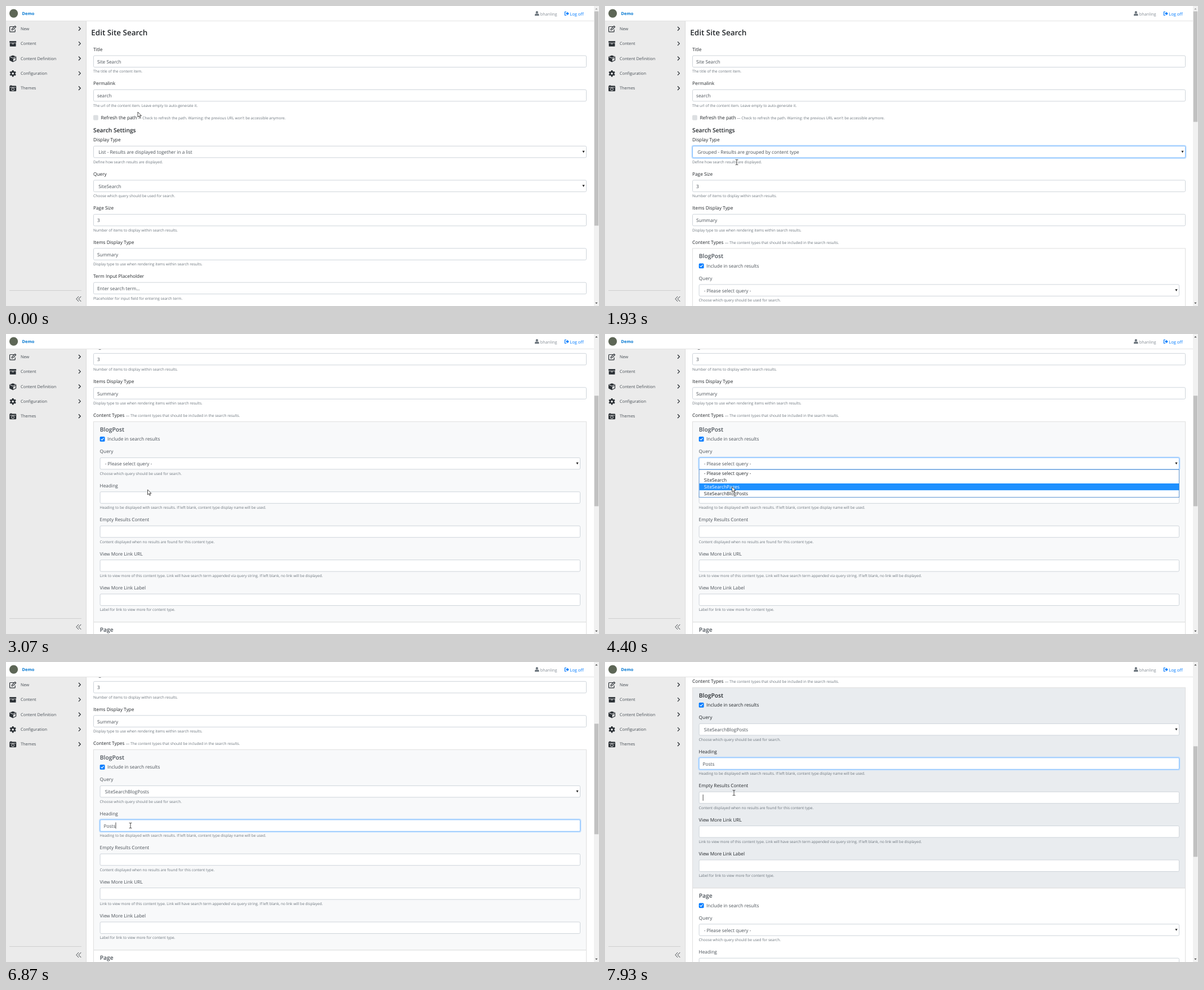
These frames come from a looping animation (1053 by 532 pixels, 8000 ms). An HTML page:

```html
<!DOCTYPE html>
<html lang="en">
<head>
<meta charset="utf-8">
<title>Edit Site Search</title>
<style>
  html, body { margin: 0; width: 100%; height: 100%; overflow: hidden; background: #fff; }
  svg { display: block; width: 100%; height: 100%; }
  text { font: 8.3px "Open Sans", "Noto Sans", sans-serif; white-space: pre; text-rendering: geometricPrecision; }
  .help { font-size: 6.6px; fill: #6c757d; }
  .val { fill: #495057; }
  .h4 { font-size: 13.5px; font-weight: 600; }
  .h5 { font-size: 10.25px; font-weight: 600; }
  .nav { font-size: 7.4px; fill: #495057; }
  .brand { font-size: 7.4px; font-weight: 700; fill: #0076d1; }
  .user { font-size: 7.3px; fill: #868e96; }
  .link { font-size: 7.6px; fill: #007bff; }
</style>
</head>
<body>
<svg id="stage" viewBox="0 0 1053 532"></svg>
<script>
const NS = 'http://www.w3.org/2000/svg';
const stage = document.getElementById('stage');

function el(parent, name, attrs = {}, content) {
  const node = document.createElementNS(NS, name);
  for (const key in attrs) node.setAttribute(key, attrs[key]);
  if (content) node.textContent = content;
  return parent.appendChild(node);
}
const group = (parent, attrs) => el(parent, 'g', attrs);
const label = (parent, x, y, str, cls = '') => el(parent, 'text', { x, y, class: cls }, str);
const rect = (parent, x, y, width, height, fill, more) =>
  el(parent, 'rect', { x, y, width, height, fill, ...more });
const line = (parent, d, stroke, width = 1) =>
  el(parent, 'path', { d, stroke, fill: 'none', 'stroke-width': width, 'stroke-linecap': 'round', 'stroke-linejoin': 'round' });
const shape = (parent, d, fill) => el(parent, 'path', { d, fill });
const show = (node, on) => node.setAttribute('display', on ? 'inline' : 'none');
const move = (node, x, y) => node.setAttribute('transform', `translate(${x} ${y})`);

// One form row; y is the middle of its label.
function field(parent, y, name, value, help, { x = 155, w = 876, select = false } = {}) {
  label(parent, x, y + 3, name);
  const box = { rx: 2, stroke: '#ced4da' };
  rect(parent, x + .5, y + 11, w - 1, 20.5, '#fff', box);
  const ring = group(parent);
  rect(ring, x - .6, y + 9.9, w + 1.2, 22.7, 'none', { rx: 3, stroke: '#bfdeff', 'stroke-width': 1.8 });
  rect(ring, x + .5, y + 11, w - 1, 20.5, '#fff', { rx: 2, stroke: '#80bdff' });
  show(ring, false);
  const text = label(parent, x + (select ? 9.2 : 7), y + 24.8, value, 'val');
  if (select) shape(parent, `M${x + w - 7.6} ${y + 19.4}h4.2l-2.1 3.6z`, '#222');
  label(parent, x, y + 41.3, help, 'help');
  return { ring, text };
}

function dropdown(parent, x, y, w, items) {
  const g = group(parent), row = 12.1;
  rect(g, x + .5, y + .5, w - 1, row * items.length + .8, '#fff', { stroke: '#5a92cf' });
  const bar = rect(g, x + 1, 0, w - 2, row, '#1e90ff');
  const texts = items.map((str, i) => label(g, x + 9.2, y + row * i + 9.8, str));
  return index => {
    show(g, index >= 0);
    bar.setAttribute('y', y + .9 + row * Math.max(index, 0));
    texts.forEach((t, i) => t.setAttribute('fill', i === index ? '#fff' : '#212529'));
  };
}

function tick(parent, y) {
  rect(parent, 166.7, y - 4.4, 8.8, 8.8, '#007bff', { rx: 1.6 });
  line(parent, `M169 ${y + .2}l1.5 1.6l2.8-3.6`, '#fff', 1.2);
  label(parent, 180, y + 3, 'Include in search results');
}

function card(parent, y, name, rows) {
  const g = group(parent, { fill: '#495057' });
  const back = rect(g, 155.5, y, 875, 355.4, '#fff', { stroke: '#dfdfdf' });
  label(g, 166.8, y + 17.4, name, 'h5');
  tick(g, y + 31);
  const opts = { x: 166.6, w: 853.4 };
  const parts = rows.map(([title, value, help], i) =>
    field(g, y + 53 + 60.4 * i, title, value, help, { ...opts, select: i === 0 }));
  return { g, back, parts };
}

// Scrolling page
rect(stage, 0, 0, 1053, 532, '#fff');
const page = group(stage, { fill: '#212529' });
label(page, 151.2, 51.6, 'Edit Site Search', 'h4');
field(page, 77, 'Title', 'Site Search', 'The title of the content item.');
field(page, 137.4, 'Permalink', 'search', 'The url of the content item. Leave empty to auto-generate it.');
rect(page, 155, 193.6, 8.8, 8.8, '#dcdfe2', { rx: 1.6 });
label(page, 168.4, 201, 'Refresh the path');
label(page, 234, 200.8, "— Check to refresh the path. Warning: the previous URL won't be accessible anymore.", 'help');
label(page, 155, 224, 'Search Settings', 'h5');

const chooseQuery = 'Choose which query should be used for search.';
const listName = 'List - Results are displayed together in a list';
const groupName = 'Grouped - Results are grouped by content type';
const pickQuery = '- Please select query -';
const display = field(page, 237.4, 'Display Type', listName, 'Define how search results are displayed.', { select: true });

function sizeRows(g, y) {
  field(g, y, 'Page Size', '3', 'Number of items to display within search results.');
  field(g, y + 60.4, 'Items Display Type', 'Summary', 'Display type to use when rendering items within search results.');
}
const listView = group(page);
field(listView, 297.9, 'Query', 'SiteSearch', chooseQuery, { select: true });
sizeRows(listView, 358.4);
field(listView, 479.2, 'Term Input Placeholder', 'Enter search term...', 'Placeholder for input field for entering search term.');

const groupView = group(page);
sizeRows(groupView, 297.9);
label(groupView, 155, 421.8, 'Content Types');
label(groupView, 212.8, 421.6, '— The content types that should be included in the search results.', 'help');
const rows = [
  ['Query', pickQuery, chooseQuery],
  ['Heading', '', 'Heading to be displayed with search results. If left blank, content type display name will be used.'],
  ['Empty Results Content', '', 'Content displayed when no results are found for this content type.'],
  ['View More Link URL', '', 'Link to view more of this content type. Link will have search term appended via query string. If left blank, no link will be displayed.'],
  ['View More Link Label', '', 'Label for link to view more for content type.']
];
card(groupView, 785.3, 'Page', rows);
const posts = card(groupView, 429.9, 'BlogPost', rows);
const [query, heading] = posts.parts;
const caret = rect(groupView, 0, 0, .8, 11, '#222');

const displayList = dropdown(page, 155, 269.6, 876, [listName, groupName]);
const queryList = dropdown(page, 166.6, 514.4, 853.4, [pickQuery, 'SiteSearch', 'SiteSearchPages', 'SiteSearchBlogPosts']);
const hint = group(page);
rect(hint, 166.8, 576, 105.6, 30.4, '#fff', { rx: 1.5, stroke: '#cfd3d7', 'stroke-width': .8 });
label(hint, 175.5, 594, 'Posts');

// Top bar and side menu
rect(stage, 0, 0, 1044, 26, '#fff');
rect(stage, 0, 26, 1044, 1, '#e3e3e3');
rect(stage, 0, 27, 142, 505, '#ebebeb');
rect(stage, 142, 27, 1, 505, '#dadada');
el(stage, 'circle', { cx: 13.6, cy: 13.1, r: 7.6, fill: '#5d6656' });
label(stage, 28.6, 16, 'Demo', 'brand');
el(stage, 'circle', { cx: 942.8, cy: 11.2, r: 2.1, fill: '#6c757d' });
shape(stage, 'M939 17.2v-1.4q0-2.3 2.2-2.3h3.2q2.2 0 2.2 2.3v1.4z', '#6c757d');
label(stage, 948.8, 16.5, 'bhanling', 'user');
line(stage, 'M994.6 10.3h-2.2v6.2h2.2', '#007bff', 1.1);
shape(stage, 'M994.3 12.3h2.2v-2.2l3.2 3.3l-3.2 3.3v-2.2h-2.2z', '#007bff');
label(stage, 1001.2, 16.5, 'Log off', 'link');

const ink = '#2b3035';
const icons = [
  g => {
    line(g, 'M2-4.2h-6.6q-1 0-1 1v7.4q0 1 1 1h7.6q1 0 1-1v-2.8', ink, 1.2);
    line(g, 'M-2 2l.5-2.2l5.3-5.2l1.7 1.7l-5.2 5.2z', ink, 1.1);
  },
  g => {
    rect(g, -6, -4.8, 12, 2.7, ink, { rx: .5 });
    rect(g, -5.4, -1.4, 10.8, 6.2, ink, { rx: .6 });
    rect(g, -1.7, -.4, 3.4, 1, '#ebebeb');
  },
  g => {
    shape(g, 'M0-6l6 2.4v6.6l-6 3l-6-3v-6.6z', ink);
    line(g, 'M-4.6-3l4.6 1.9l4.6-1.9', '#ebebeb', 1);
    shape(g, 'M.7.3l4.1-1.8v3.9l-4.1 2.1z', '#ebebeb');
  },
  g => {
    el(g, 'circle', { r: 3.1, fill: 'none', stroke: ink, 'stroke-width': 2.6 });
    for (let a = 0; a < 360; a += 60) rect(g, -1.3, -5.8, 2.6, 2.4, ink, { rx: .4, transform: `rotate(${a})` });
  },
  g => {
    rect(g, -6, -4.6, 12, 9.8, ink, { rx: 1.2 });
    rect(g, -4.8, -5.4, 3, 1.4, ink);
    rect(g, -5, -2.3, 10, .8, '#ebebeb');
    el(g, 'circle', { cy: 1.5, r: 2.4, fill: 'none', stroke: '#ebebeb', 'stroke-width': .9 });
  }
];
['New', 'Content', 'Content Definition', 'Configuration', 'Themes'].forEach((name, i) => {
  const y = 40.3 + 26.35 * i;
  icons[i](group(stage, { transform: `translate(12.2 ${y + .4})` }));
  label(stage, 26, y + 2.6, name, 'nav');
  line(stage, `M129.3 ${y - 3}l3 3l-3 3`, ink, 1.3);
});
rect(stage, 6, 504, 128, 1, '#cfcfcf');
line(stage, 'M128.8 515.3l-4 4.2l4 4.2M133 515.3l-4 4.2l4 4.2', ink, .9);

// Scrollbar
rect(stage, 1044, 0, 9, 532, '#f1f1f1');
const upArrow = shape(stage, 'M1046.2 6.3h4.4l-2.2-2.6z', '#a3a3a3');
shape(stage, 'M1046.2 525.7h4.4l-2.2 2.6z', '#505050');
const thumb = rect(stage, 1044.8, 9.5, 7.4, 380, '#c1c1c1');

// Pointers
const arrow = group(stage), beam = group(stage);
el(arrow, 'path', { d: 'M0 0v9l2.1-1.9l1.4 3.2l1.5-.6l-1.4-3.1h2.9z', fill: '#fff', stroke: '#111', 'stroke-width': .75 });
line(beam, 'M-2-4.6h1.2q.8 0 .8.8v7.6q0 .8-.8.8h-1.2M2-4.6h-1.2q-.8 0-.8.8M2 4.6h-1.2q-.8 0-.8-.8', '#222', .8);

// Timelines: [ms, value...]
const pointerPath = [
  [0, 234, 188], [330, 178, 222], [600, 212, 250], [800, 228, 261], [1130, 228, 261],
  [1470, 232, 279], [1730, 234, 285], [1870, 234, 285], [1930, 234, 277], [2330, 238, 296],
  [2800, 241, 293], [3070, 251.5, 276], [3330, 256, 268], [3400, 256, 268], [3670, 232, 231],
  [3930, 225, 268], [4330, 225, 268], [4400, 225.5, 271], [4600, 226, 281], [4730, 226, 281],
  [5130, 221, 290], [7270, 221, 290], [7930, 229, 232]
];
const scrollPath = [
  [1930, 0], [2000, 20], [2330, 183.5], [2470, 219.6], [2730, 219.6], [3000, 274.5],
  [7270, 274.5], [7400, 300], [7670, 384.5]
];
const displayPick = [[0, -1], [1000, 0], [1530, 1], [1730, -1]];
const queryPick = [[0, -1], [3670, 0], [3800, 1], [3930, 2], [4530, 3], [4800, -1]];
const typed = [[0, ''], [6130, 'P'], [6330, 'Po'], [6400, 'Pos'], [6600, 'Post'], [6870, 'Posts']];
const beamOn = [[0, false], [1930, true], [2600, false], [4930, true]];
const pressOn = [[0, false], [3670, true], [3800, false], [5330, true], [5400, false], [7930, true]];
const caretOn = [[0, false], [5330, true], [5870, false], [6130, true], [7400, false], [7930, true]];

const held = (steps, t) => steps.reduce((v, s) => t >= s[0] ? s[1] : v, steps[0][1]);
function along(path, t) {
  const i = path.findIndex(p => p[0] > t);
  if (i < 0) return path[path.length - 1].slice(1);
  if (i === 0) return path[0].slice(1);
  const a = path[i - 1], b = path[i], k = (t - a[0]) / (b[0] - a[0]);
  return a.slice(1).map((v, j) => v + (b[j + 1] - v) * k);
}
const between = (t, a, b) => t >= a && t < b;

function render(t) {
  const grouped = t >= 1930, pressed = held(pressOn, t);
  const [scroll] = along(scrollPath, t);
  const [px, py] = along(pointerPath, t);

  move(page, 0, -scroll);
  show(listView, !grouped);
  show(groupView, grouped);
  thumb.setAttribute('y', 9.5 + scroll * .364);
  thumb.setAttribute('height', grouped ? 196 : 380);
  upArrow.setAttribute('fill', scroll ? '#505050' : '#a3a3a3');

  display.text.textContent = t >= 1730 ? groupName : listName;
  query.text.textContent = t >= 4800 ? 'SiteSearchBlogPosts' : pickQuery;
  heading.text.textContent = held(typed, t);
  displayList(held(displayPick, t));
  queryList(held(queryPick, t));
  show(display.ring, between(t, 1000, 3670));
  show(query.ring, between(t, 3670, 5330));
  show(heading.ring, t >= 5330);
  show(hint, between(t, 5470, 6870));

  posts.back.setAttribute('fill', pressed ? '#e9ecef' : t >= 2600 ? '#f8f9fa' : '#fff');
  posts.g.setAttribute('fill', pressed ? '#212529' : '#495057');

  const moved = t >= 7930;
  const width = moved || !held(typed, t) ? 0 : heading.text.getComputedTextLength();
  show(caret, held(caretOn, t));
  caret.setAttribute('x', 173.7 + width);
  caret.setAttribute('y', moved ? 619.5 : 559);

  const isBeam = held(beamOn, t);
  show(beam, isBeam);
  show(arrow, !isBeam);
  move(isBeam ? beam : arrow, px, py);
}

const LOOP = 8000, STEP = 1000 / 15;
const start = performance.now();
function frame() {
  const t = (performance.now() - start) % LOOP;
  render(Math.round(Math.floor((t + 5) / STEP) * STEP / 10) * 10 % LOOP);
  requestAnimationFrame(frame);
}
frame();
</script>
</body>
</html>
```
